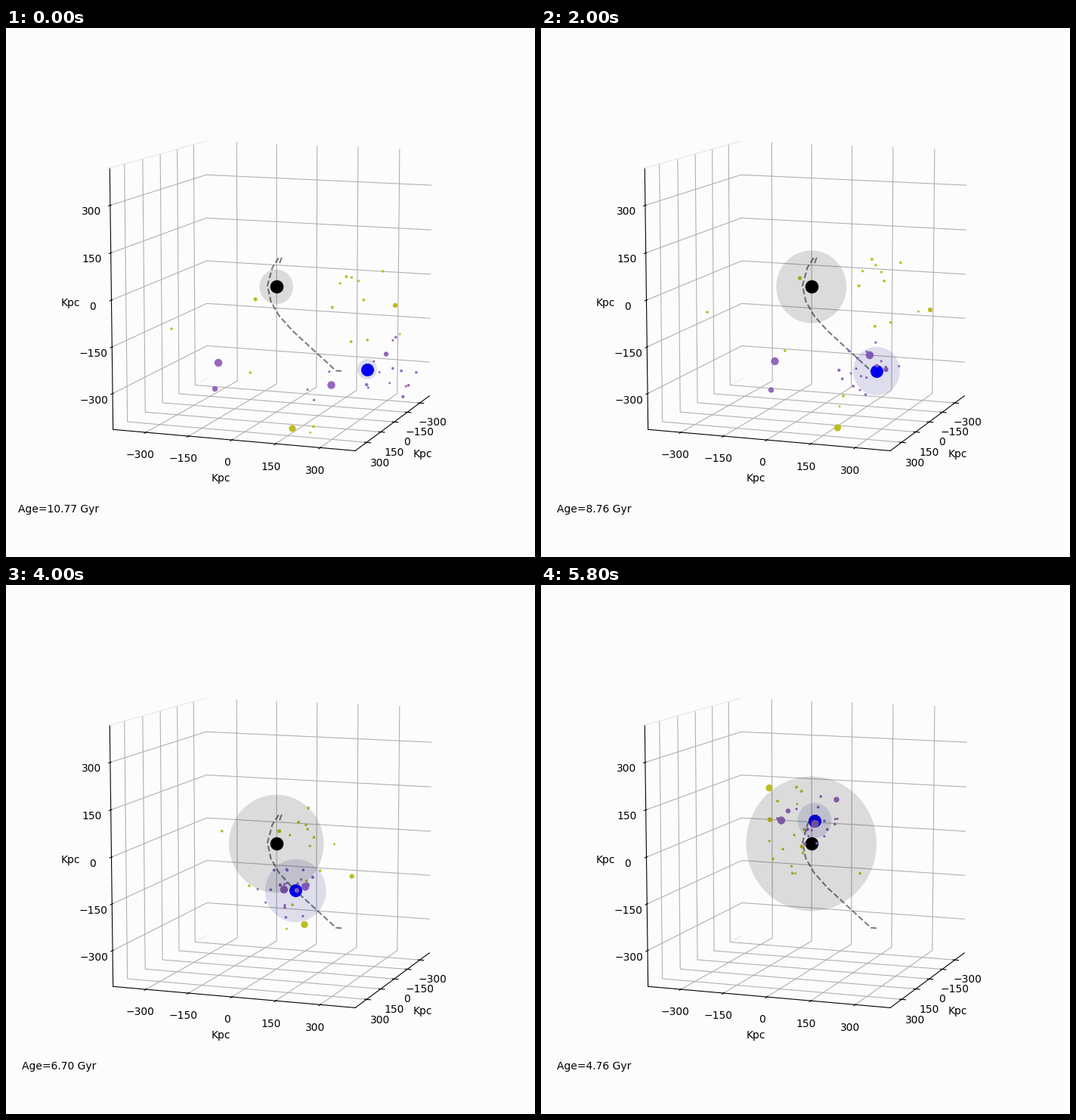
A matplotlib script that plays this animation: 700 by 700 pixels, repeating every 6000 ms.

```python
import numpy as np
import matplotlib.pyplot as plt
from matplotlib.animation import FuncAnimation
from matplotlib.patches import Ellipse

SIZE, DPI, FRAMES, STEP = 700, 100, 30, 200
OLIVE, PURPLE = "#bcbd22", "#9467bd"
Z_STRETCH = 1.033
rng = np.random.default_rng(12)
t = np.arange(FRAMES)
u = t / (FRAMES - 1)

plt.rcParams["font.family"] = "DejaVu Sans"
fig = plt.figure(figsize=(SIZE / DPI, SIZE / DPI), dpi=DPI, facecolor="#fcfcfc")

# --- the box: three axes of +-400 kpc with a small margin
box = fig.add_axes([0.1, 0.1, 0.8, 0.8], projection="3d", facecolor="none")
edge = 400 * 25 / 24
for x_end, z in [(edge, edge), (-340, -edge)]:
    box.plot([x_end, -edge], [-edge, -edge], [z, z], color="#e6e6e6", lw=0.8)
ticks = np.arange(-300, 301, 150)
box.set(xlim=(-edge, edge), ylim=(-edge, edge), zlim=(-edge, edge),
        xticks=ticks, yticks=ticks, zticks=ticks,
        xlabel="Kpc", ylabel="Kpc", zlabel="Kpc")
for axis in (box.xaxis, box.yaxis, box.zaxis):
    axis.set_pane_color((1, 1, 1, 0))
box.set_box_aspect((1, 1, Z_STRETCH))
box.view_init(elev=10, azim=20)

# --- flat layer in pixels for everything that moves
sky = fig.add_axes([0, 0, 1, 1])
sky.set(xlim=(0.5, SIZE + 0.5), ylim=(SIZE, 0))
sky.axis("off")
HOST = np.array([358.2, 342.4])


def area(radius):
    return (2 * np.asarray(radius) * 72 / DPI) ** 2


def core(color, radius):
    return sky.scatter(*HOST[:, None], s=area(radius), c=color, lw=0, zorder=3)


def halo(color, alpha, z):
    return sky.add_patch(Ellipse(HOST, 1, 1, fc=color, alpha=alpha, lw=0, zorder=z))


def keyed(frames, values):
    return np.interp(t, frames, values)


# --- the satellite walks along its trail and turns at the far end
trail = np.array([(478.5, 451.5), (461.5, 452.5), (444.5, 454), (437, 453.5), (430, 447),
                  (405, 424), (380, 401), (362, 381), (351, 362), (346.5, 341),
                  (353, 317), (361.5, 304), (365, 304.5), (362.5, 311.5)])
walk = keyed([0, 6, 10, 14, 18, 22, 29], [0, 1, 2, 4, 4.85, 6.85, 13])
blue_at = np.column_stack([np.interp(walk, np.arange(len(trail)), c) for c in trail.T])
sky.plot(*trail[2:].T, color="black", lw=1.5, ls="--", alpha=0.5, zorder=2)

blue_r = keyed([0, 6, 10, 14, 22, 29], [13, 17.7, 31, 37.5, 41.3, 22.5])
black_r = keyed([0, 6, 10, 18, 22, 29], [22.3, 38, 46.5, 55, 70.5, 86.2])
ages = keyed([0, 14, 22, 29], [10.77, 7.96, 6.28, 4.76])

# --- small bodies
tracks, colors, radii = [], [], []


def add(color, radius, track):
    tracks.append(track)
    colors.append(color)
    radii.append(radius)


def lead(color, radius, *points):
    """Large body on a cubic through four key points."""
    fit = np.polyfit([0, 10, 22, 29], points, 3)
    add(color, radius, np.vander(t, 4) @ fit)


def infall(n, center, spread):
    """Bodies that rise a little, then speed up towards the host."""
    for start in center + rng.uniform(-1, 1, (n, 2)) * spread:
        end = rng.uniform((295, 265), (352, 388))
        track = start + np.outer(u ** 2, end - start)
        track[:, 1] -= 110 * u * (1 - u) ** 2
        add(OLIVE, rng.uniform(1.4, 2), track)


def swarm(n):
    """Bodies that close in on the satellite and then circle it."""
    reach = 42 + 36 * np.clip(1 - t / 10, 0, 1) ** 2
    for _ in range(n):
        angle = rng.uniform(0, 2 * np.pi) + t * 2 * np.pi / rng.uniform(14, 30)
        dist = reach * np.sqrt(rng.uniform(0.03, 1))
        tilt = rng.uniform(0.6, 1)
        around = np.column_stack([dist * np.cos(angle) - 10, tilt * dist * np.sin(angle)])
        add(PURPLE, rng.uniform(1.4, 2.3), blue_at + around)


lead(OLIVE, 1.8, (219.5, 398), (220.5, 376), (309.5, 325.5), (422.5, 381.5))
lead(OLIVE, 2.6, (330.5, 359), (343, 331), (362.5, 328), (345.5, 346))
lead(OLIVE, 4.6, (379.5, 530), (393, 529), (385.5, 419.5), (302.5, 268.5))
lead(OLIVE, 3.2, (515.5, 367), (515.5, 373), (434, 379), (303.5, 310.5))
lead(PURPLE, 5.2, (281.5, 443), (310, 441), (403.5, 385), (363, 316))
lead(PURPLE, 3.7, (277, 477.5), (305, 479), (409.5, 374), (391.5, 284))
lead(PURPLE, 5.2, (431, 472.5), (435.5, 433), (354, 390.5), (318.5, 311.5))
lead(PURPLE, 3.2, (503.5, 431.5), (457, 452), (371, 386), (327.5, 299))
infall(10, (482, 365), (50, 56))
infall(2, (405, 530), (3, 6))
infall(1, (323, 456), (1, 1))
swarm(17)

tracks = np.array(tracks)
blue = core("blue", 8.5)
black = core("black", 8.8)
dots = sky.scatter(*tracks[:, 0].T, s=area(radii), c=colors, lw=0, zorder=4)
blue_halo = halo("navy", 0.12, 5)
black_halo = halo("black", 0.13, 6)
age = fig.text(0.1, 59 / SIZE, "", size=10, ha="center")


def resize(patch, radius):
    patch.set(width=2 * radius, height=2 * radius * Z_STRETCH)


def draw(i):
    dots.set_offsets(tracks[:, i])
    blue.set_offsets(blue_at[i])
    blue_halo.center = blue_at[i]
    resize(blue_halo, blue_r[i])
    resize(black_halo, black_r[i])
    age.set_text(f"Age={ages[i]:.2f} Gyr")
    return []


anim = FuncAnimation(fig, draw, frames=FRAMES, interval=STEP, repeat=True, blit=False)
plt.show()
```
